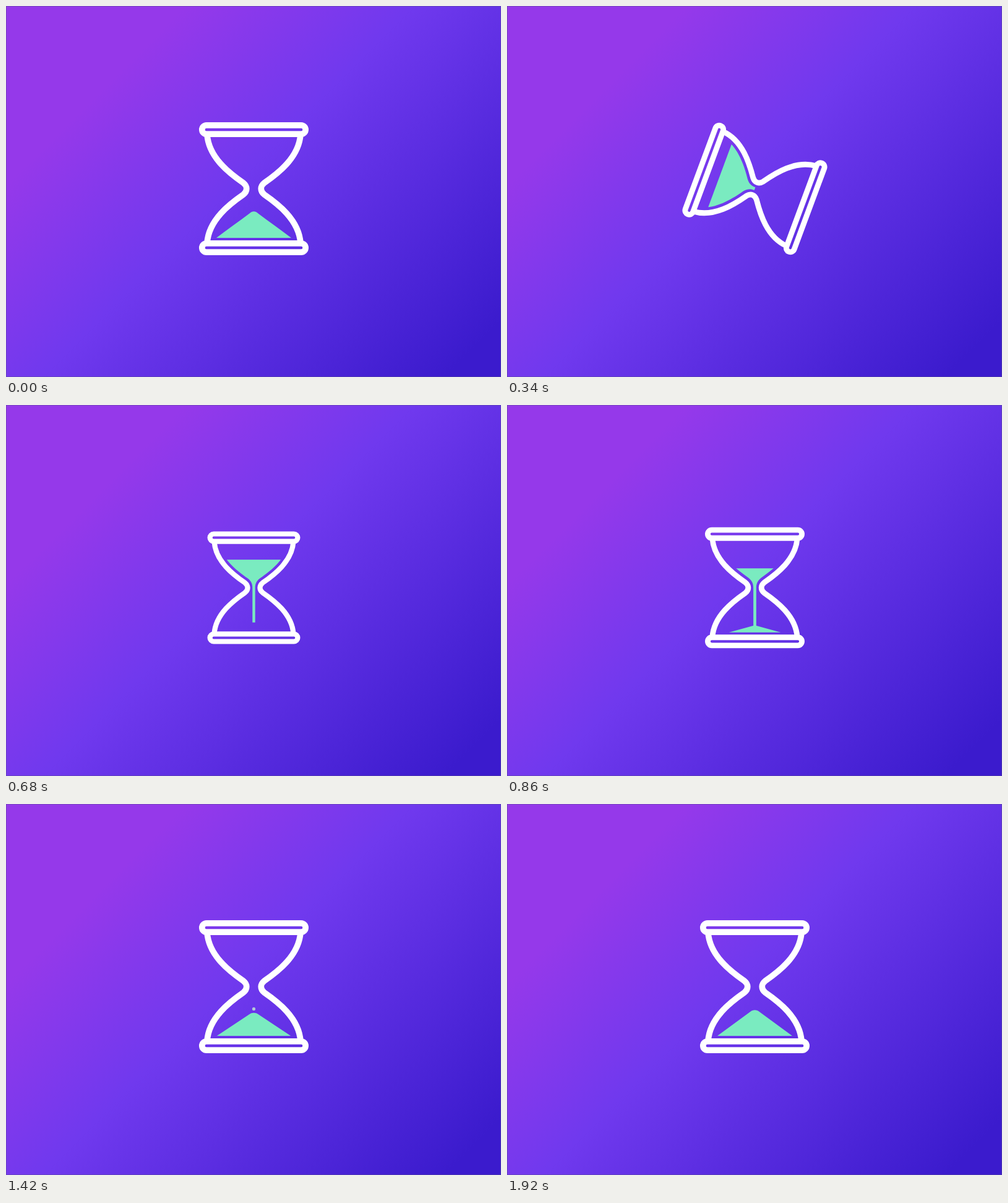
Recreate the animation shown at these times as an HTML page. Size 800 px wide and 600 px high, loop 1.94 s.

```html
<!DOCTYPE html>
<html lang="en">
<head>
<meta charset="utf-8">
<title>Hourglass</title>
<style>
  html, body { margin: 0; width: 100%; height: 100%; overflow: hidden; background: #6637e8; }
  svg { display: block; width: 100vw; height: 100vh; }
  .frame { fill: none; stroke: #fff; stroke-width: 9.7; }
  .sand { fill: #7aebc0; }
</style>
</head>
<body>
<svg viewBox="0 0 800 600">
  <defs>
    <linearGradient id="bg" gradientUnits="userSpaceOnUse" x1="145" y1="145" x2="655" y2="655">
      <stop offset="0" stop-color="#9539ea"/>
      <stop offset=".36" stop-color="#7039ee"/>
      <stop offset="1" stop-color="#3b1bcd"/>
    </linearGradient>
    <clipPath id="funnel">
      <path d="M-65.5 88C-63.4 56.4 -32.9 32.6 -11.3 17.7C-4 12 -2.6 6 -2.6 0V-80H2.6V0C2.6 6 4 12 11.3 17.7C32.9 32.6 63.4 56.4 65.5 88Z"/>
    </clipPath>
  </defs>
  <rect width="800" height="600" fill="url(#bg)"/>
  <rect x=".5" y=".5" width="799" height="599" fill="none" stroke="#5a5096" stroke-opacity=".5"/>
  <g id="glass">
    <path id="pile" class="sand"/>
    <g clip-path="url(#funnel)"><rect id="flow" class="sand" x="-80" width="160"/></g>
    <path id="heap" class="sand"/>
    <circle id="grain" r="2.6" fill="#b2c8d6"/>
    <g class="frame">
      <rect x="-83.7" y="-102.7" width="167.4" height="14.4" rx="7.2"/>
      <rect x="-83.7" y="88.3" width="167.4" height="14.4" rx="7.2"/>
      <path id="wall" d="M-75.5 -88C-73 -50 -38 -24 -17 -9.5C-10 -4 -10 4 -17 9.5C-38 24 -73 50 -75.5 88"/>
      <use href="#wall" transform="scale(-1 1)"/>
    </g>
  </g>
</svg>
<script>
const LOOP = 1940;
const el = id => document.getElementById(id);
const [glass, pile, flow, heap, grain] = ['glass', 'pile', 'flow', 'heap', 'grain'].map(el);

const linear = s => s;
const smooth = s => s * s * (3 - 2 * s);
const mix = (a, b, s) => a + (b - a) * s;

// Value at time t along keys of the form [time, value].
function track(t, keys, ease = linear) {
  if (t <= keys[0][0]) return keys[0][1];
  for (let i = 1; i < keys.length; i++) {
    const [t0, a] = keys[i - 1], [t1, b] = keys[i];
    if (t < t1) {
      const s = ease((t - t0) / (t1 - t0));
      return Array.isArray(a) ? a.map((v, k) => mix(v, b[k], s)) : mix(a, b, s);
    }
  }
  return keys[keys.length - 1][1];
}

// Closed symmetric shape; p lists the right side from base corner to tip.
function pilePath(p) {
  const pts = [];
  for (let i = 0; i < p.length; i += 2) pts.push([p[i], p[i + 1]]);
  const left = pts.map(([x, y]) => [-x, y]).reverse();
  return `M${pts[0]}C${pts.slice(1).join(' ')}L${left[0]}C${left.slice(1).join(' ')}Z`;
}

const rest    = [60.5, 79.5, 43, 66.5, 24, 52.6, 7, 40, 4.5, 37.8, 2.5, 36.8, 0, 36.8];
const slumped = [61.7, 74, 57, 52, 30, 32, 9, 19.8, 6, 17.8, 3, 17.5, 0, 17.5];
const settled = [59, 66, 52, 48, 30, 31, 11, 17.7, 4, 12, 2.5, 6, 1.5, 0];

const POUR = 340;
const angleKeys = [[30, 0], [570, 180]];
const scaleKeys = [[30, 1], [610, .843], [630, .843], [1180, 1.016], [1380, 1]];
const pileKeys = [[30, rest], [160, slumped], [POUR, settled]];
const heightKeys = [[690, 0], [860, 12], [1420, 38], [1760, 42.7]];
const widthKeys = [[690, 8], [860, 46], [1100, 56], [1420, 59.7], [1760, 60.5]];

const show = (node, on) => node.setAttribute('visibility', on ? 'visible' : 'hidden');

function drawFlow(t, floor) {
  const on = t >= POUR && t < 1400;
  show(flow, on);
  if (!on) return;
  const level = t < 500 ? track(t, [[POUR, 66], [500, 62]])
                        : track(t, [[500, 62], [1280, 0]], smooth);
  const tail = t > 1240 ? floor * ((t - 1240) / 160) ** 2 : 0;
  const tip = t < 500 ? track(t, [[POUR, 0], [500, 6.5]])
                      : 6.5 + 73 * ((t - 500) / 200) ** 2;
  const top = level - tail, bottom = -Math.min(tip, floor + 2);
  flow.setAttribute('y', bottom);
  flow.setAttribute('height', Math.max(0, top - bottom));
}

function drawHeap(t, h) {
  show(heap, h > 0);
  const w = track(t, widthKeys);
  const r = 7 * Math.min(1, h / 40);
  const edge = 79.5 - (h + 1.8 * r / 7) * (1 - r / w);
  const peak = 79.5 - h;
  heap.setAttribute('d',
    `M${-w} -79.5L${-r} ${-edge}C${-r * .6} ${-peak} ${r * .6} ${-peak} ${r} ${-edge}L${w} -79.5Z`);
}

function draw(now) {
  const t = now % LOOP;
  const h = track(t, heightKeys);
  glass.setAttribute('transform',
    `translate(400.5 295.5) rotate(${track(t, angleKeys, smooth)}) scale(${track(t, scaleKeys, smooth)})`);

  show(pile, t < POUR);
  if (t < POUR) pile.setAttribute('d', pilePath(track(t, pileKeys)));

  drawFlow(t, 79.5 - h);
  drawHeap(t, h);

  show(grain, t > 1290 && t < 1432);
  grain.setAttribute('cy', -41 * ((t - 1290) / 140) ** 2);
}

const start = performance.now();
(function tick() {
  draw(performance.now() - start);
  requestAnimationFrame(tick);
})();
</script>
</body>
</html>
```
